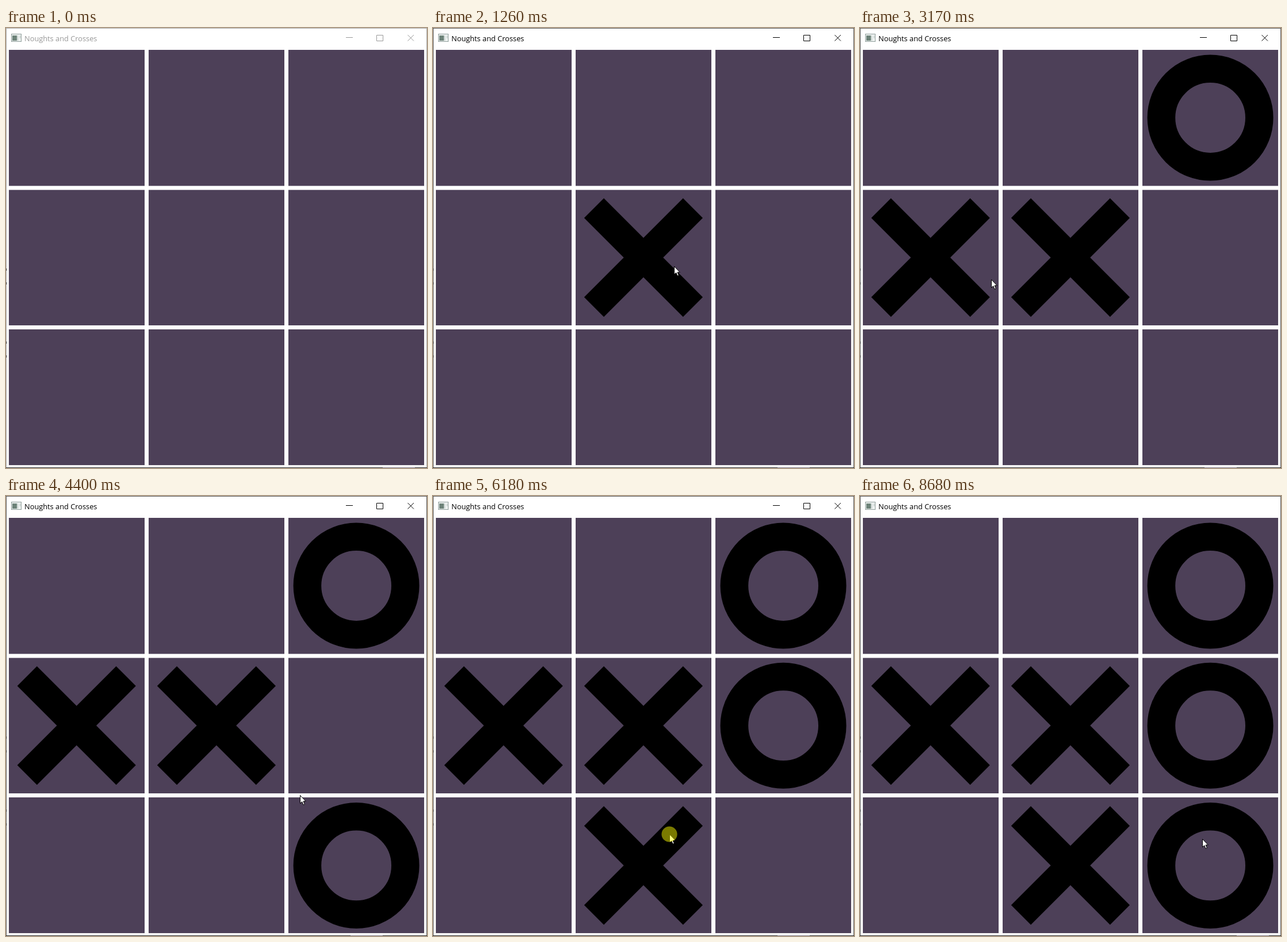
Recreate the animation shown at these times as an HTML page. Size 732 by 765 pixels, loop 8.74 s.

```html
<!DOCTYPE html>
<html lang="en">
<head>
<meta charset="utf-8">
<title>Noughts and Crosses</title>
<style>
  html, body { margin: 0; width: 100%; height: 100%; overflow: hidden; background: #fff; }
  svg { display: block; }
  text { font: 12.8px "Open Sans", "Noto Sans", sans-serif; }
</style>
</head>
<body>
<svg width="732" height="765" viewBox="0 0 732 765">
  <defs>
    <path id="X" d="M-86-86L86 86M86-86L-86 86" stroke="#000" stroke-width="48.4"/>
    <circle id="O" r="85.2" fill="none" stroke="#000" stroke-width="48.6"/>
  </defs>
  <rect width="732" height="765" fill="#fff"/>
  <g id="icon">
    <rect x="9.5" y="10.5" width="17" height="13" fill="#eef2f1" stroke="#8f9d9a"/>
    <rect x="11" y="13" width="8" height="9" fill="#6d8379"/>
    <path d="M20.5 13V22M24.5 13V18" stroke="#b4bfbc"/>
  </g>
  <text id="title" x="32" y="23">Noughts and Crosses</text>
  <path id="buttons" fill="none"
    d="M591 16.5H603M644.5 12.5H655.5V22.5H644.5ZM698.5 12L709 22.5M709 12L698.5 22.5"/>
  <rect x="5" y="38" width="722" height="722" fill="#4d4058"/>
  <path d="M244.5 38V760M487.5 38V760M5 278H727M5 520.5H727" stroke="#fff" stroke-width="7"/>
  <g id="marks"></g>
  <rect id="border" x=".5" y=".5" width="731" height="764" fill="none"/>
  <path d="M0 764.5H732" stroke="#222"/>
  <path id="glint" d="M599 764.5h56" stroke="#77717f"/>
  <path d="M.5 418V466M.5 545V593" stroke="#222" stroke-dasharray="4 20"/>
  <g id="pointer">
    <path d="M.5 .5V14.5L3.7 11.5L6 17L8.3 16L6 10.8H10.3Z" fill="#fff" stroke="#000"/>
    <circle id="click" r="13.6" fill="#ff0" fill-opacity=".48"/>
  </g>
</svg>
<script>
const LOOP = 8740, START = 213, STEP = 68.3, PITCH = 243.2;
const $ = id => document.getElementById(id);

// Each leg bends towards "via" and ends at "at"; times are in steps.
const home = [668, 735];
const legs = [
  { from: 0, to: 9, via: [520, 550], at: [419, 414], click: 13 },
  { from: 15, to: 25, via: [520, 285], at: [595, 216], click: 32 },
  { from: 33, to: 45, via: [441, 499], at: [128, 421], click: 45 },
  { from: 49, to: 64, via: [392, 664], at: [595, 454], click: 67 },
  { from: 68, to: 80, via: [440, 430], at: [411, 588], click: 87 },
  { from: 91, to: 105, via: [-60, 70], at: [449, 366] },
  { from: 105, to: 118, via: [637, 529], at: [595, 596], click: 119 }
];
const moves = legs.filter(leg => leg.click);

const cellAt = ([x, y]) => Math.floor((x - 1) / PITCH) + 3 * Math.floor((y - 33) / 243);
const show = (el, on) => el.setAttribute("visibility", on ? "visible" : "hidden");

const marks = Array.from({ length: 9 }, (_, i) => {
  const el = document.createElementNS("http://www.w3.org/2000/svg", "use");
  el.setAttribute("x", 122.7 + i % 3 * PITCH);
  el.setAttribute("y", 156 + Math.floor(i / 3) * PITCH);
  return $("marks").appendChild(el);
});

function pointerAt(step) {
  const i = legs.findLastIndex(leg => step >= leg.from);
  const { from, to, via, at } = legs[i], start = i ? legs[i - 1].at : home;
  const u = Math.min(1, (step - from) / (to - from)), v = 1 - u;
  return at.map((end, k) => Math.round(v * v * start[k] + 2 * u * v * via[k] + u * u * end));
}

function draw(t) {
  const step = Math.floor((t - START) / STEP);
  const active = step >= moves[0].click, ending = t >= 8680;
  const ink = active ? "#000" : "#999";

  $("title").setAttribute("fill", ink);
  $("buttons").setAttribute("stroke", ink);
  $("border").setAttribute("stroke", active ? "#5a5a5a" : "#aaa");
  $("glint").setAttribute("transform", `translate(${active && !ending ? 0 : 56})`);
  show($("buttons"), !ending);
  show($("pointer"), step >= 0);

  const done = moves.filter(move => step >= move.click);
  const state = [];
  done.forEach((move, i) => state[cellAt(move.at)] = "XO"[i % 2]);

  // the free cell under the pointer previews the next mark
  if (step >= 0) {
    const spot = pointerAt(step), cell = cellAt(spot);
    $("pointer").setAttribute("transform", `translate(${spot})`);
    state[cell] = state[cell] || "XO"[done.length % 2];
  }
  $("click").setAttribute("r", done.some(move => move.click === step) ? 13.6 : 0);
  marks.forEach((el, i) => el.setAttribute("href", "#" + (state[i] || "none")));
}

const begin = performance.now();
function tick() {
  draw((performance.now() - begin) % LOOP);
  requestAnimationFrame(tick);
}
draw(0);
requestAnimationFrame(tick);
</script>
</body>
</html>
```
